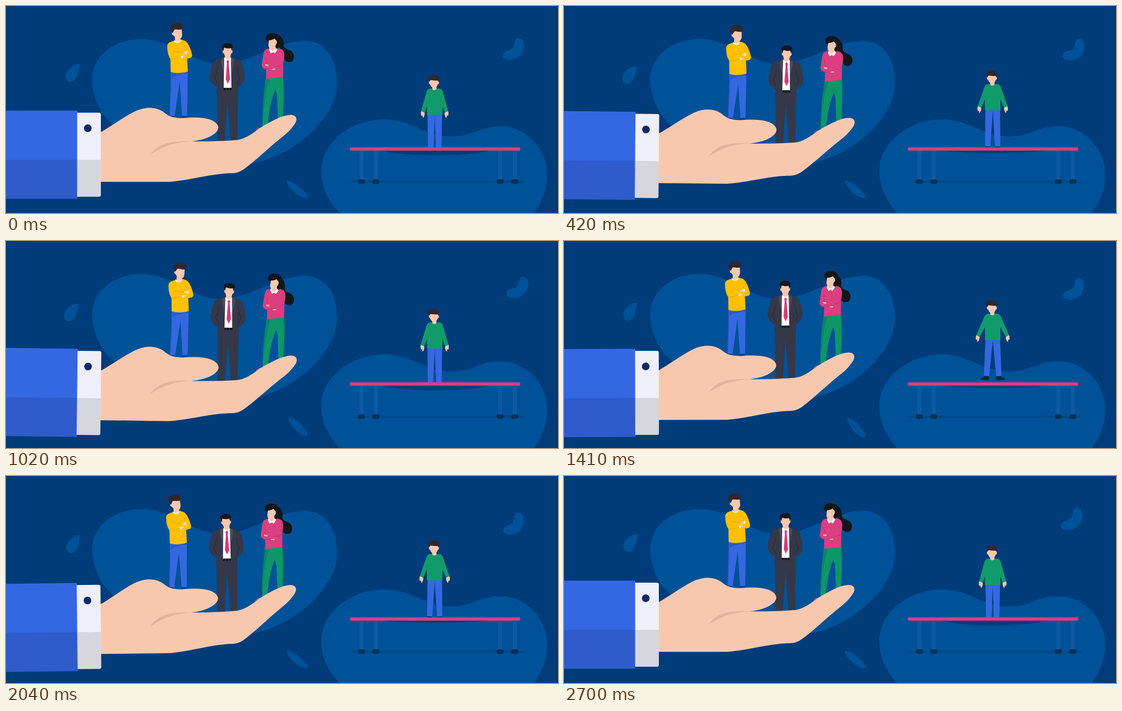
These frames come from a looping animation (1222x458 px, 2730 ms). An HTML page:

```html
<!DOCTYPE html>
<html lang="en">
<head>
<meta charset="utf-8">
<title>Safe hand and trampoline</title>
<style>
html, body { margin: 0; width: 100%; height: 100%; overflow: hidden; background: #003c7a; }
svg { display: block; width: 100%; height: 100%; }
.blob { fill: #005298; }
.skin { fill: #f8c8ae; }
.line { fill: none; stroke-linecap: round; }
</style>
</head>
<body>
<svg viewBox="0 0 1222 458">
  <defs>
    <clipPath id="aboveBar"><path d="M850 0H1050V314H850Z"/></clipPath>
    <g id="post">
      <path d="M-4.3 320H4.3V386H-4.3Z" fill="#0f59a2"/>
      <rect x="-8" y="383.5" width="16" height="10" rx="4.5" fill="#0a3156"/>
    </g>
  </defs>

  <g class="blob">
    <path d="M191 160C193 105 245 73 300 73C370 73 410 128 475 128C540 128 600 77 662 77C705 77 733 115 733 170C733 245 640 333 540 349L400 340L240 266C212 245 191 205 191 160Z"/>
    <path d="M738 458C712 430 698 400 698 365C698 300 765 251 838 251C895 251 930 289 985 289C1030 289 1050 266 1095 266C1150 266 1198 315 1198 372C1198 410 1185 435 1168 458Z"/>
    <path id="drop" d="M161 128C164 128 163 135 161 142C158 155 153 167 143 168C135 168 131 161 132 153C134 140 150 129 161 128Z"/>
    <path id="bean" d="M1134 71C1143 71 1148 80 1147 90C1145 105 1134 118 1117 119C1106 120 1099 115 1100 108C1102 99 1113 99 1120 95C1129 89 1123 72 1134 71Z"/>
    <path id="leaf" d="M622 387C630 386 643 394 653 403C661 410 669 418 668 422C666 427 655 424 646 418C635 411 620 393 622 387Z"/>
  </g>

  <!-- trampoline -->
  <rect x="762" y="386" width="384" height="6" rx="3" fill="#004a8c"/>
  <use href="#post" x="787"/><use href="#post" x="818.5"/>
  <use href="#post" x="1094"/><use href="#post" x="1126.5"/>
  <path id="sag" fill="#003c7a"/>

  <g clip-path="url(#aboveBar)">
    <g id="jumper">
      <g id="legL">
        <path d="M933 238H949.5L946 324H934.5Z" fill="#3568e0"/>
        <path d="M934.5 321H946V330H927Q927 325 934.5 324Z" fill="#12253f"/>
      </g>
      <g id="legR">
        <path d="M965.5 238H949L952 324H963.5Z" fill="#3568e0"/>
        <path d="M963.5 321H952V330H971Q971 325 963.5 324Z" fill="#12253f"/>
      </g>
      <g id="armL">
        <path class="skin" d="M919.5 232L926.5 234C928 240 926 246 923 248L922 242L920 244C918 240 918 236 919.5 232Z"/>
        <path d="M940 183Q933 183 931 190L919 233L926.5 236L936 212Z" fill="#129b6a"/>
      </g>
      <g id="armR">
        <path class="skin" d="M978.5 232L971.5 234C970 240 972 246 975 248L976 242L978 244C980 240 980 236 978.5 232Z"/>
        <path d="M958 183Q965 183 967 190L979 233L971.5 236L962 212Z" fill="#129b6a"/>
      </g>
      <path d="M939 183H959Q966 184 966 192V241H932V192Q932 184 939 183Z" fill="#129b6a"/>
      <path class="skin" d="M943.5 176H953V184Q948 189 943.5 184Z"/>
      <path class="skin" d="M937 164H957.5L958.5 170Q958 174 955.5 174Q954 181 948 182Q941 181 939 174Q936 173 936 169Z"/>
      <path d="M937 168C932 161 934 155 939 155C943 152 952 152 955 155C960 157 959 163 957.5 168L955 165C949 166 943 164 940 164Z" fill="#2f2730"/>
    </g>
  </g>
  <rect x="761" y="312.7" width="377.500" height="7.300" rx="3.650" fill="#db3e7d"/>

  <g id="hand">
    <!-- yellow sweater -->
    <path d="M365 146H402.500L401 246H390L384.500 166L373 246H362Z" fill="#3568e0"/>
    <path d="M365 147L366 180L363 245H362ZM366 149Q385 152 402 146V149Q374 152 367 160Z" fill="#2d57c2"/>
    <path d="M389 243H401V249H389ZM362 243H372V249H362Z" fill="#173a86"/>
    <path d="M373 77C361 79 357 83 357 89C357 100 359 110 364 117L364.500 146Q383 151 402.500 145L401 116C409 116 413 113 412 108C410 97 404 83 398 78Q392 75 386 74Z" fill="#ffc000"/>
    <path class="line" d="M371 101L391 102.500M364 117Q376 118 388 112M398 91Q399 97 396 101" stroke="#e6a400" stroke-width="1.300"/>
    <path class="skin" d="M391 103L399 99L398 104L393 107ZM386 111L395 109L397 112L388 115Z"/>
    <path d="M398 99L401 100V106L398 106ZM388 110L391 110V115L388 115Z" fill="#fff"/>
    <path d="M372 75Q379 83 387 74V77Q380 86 372 78Z" fill="#fff"/>
    <g id="head1">
      <path class="skin" d="M374 66H386V76Q379 83 374 76Z"/>
      <path class="skin" d="M370 52H389L390 64Q389 73 383 73Q375 72 371 65Q367 65 367 60Q368 57 370 58Z"/>
      <path d="M369 60C365 56 362 49 364 45C365 41 370 39 374 40C379 37 389 38 391 42C392 47 391 52 387 52C382 53 377 52 374 51Q371 55 369 60Z" fill="#2f2730"/>
    </g>

    <!-- suit -->
    <path d="M467 182H513.500L512 301H497.500L490.500 210L484 301H468.500Z" fill="#343849"/>
    <path d="M483 112L468 117C460 120 457 126 454 140C451 153 450 160 453 165C456 172 462 177 468 180L465.500 193H481L490 186L500 193H514.500L513 180C520 176 526 170 528 162C529 152 526 140 523 128C521 121 516 119 510 117L498 112Z" fill="#343849"/>
    <path class="line" d="M469 135Q467 150 462 158L468 172M512 135Q514 150 518 158L513 172" stroke="#252938" stroke-width="1.300"/>
    <path d="M483 114H498L499 182H482Z" fill="#fff"/>
    <path d="M483 113L476 118L477 128L482 150ZM498 113L505 118L504 128L499 150Z" fill="#484c5c"/>
    <path d="M488 122L491 119L494 122L493 127L496 162L491 172L486.500 162L489 127Z" fill="#d93b7a"/>
    <path d="M482 181H499.500V186H482Z" fill="#10131a"/>
    <path d="M487 181V186M494 181V186" stroke="#4a4e5e"/>
    <g id="head2">
      <path class="skin" d="M484.500 106H497V114Q491 121 484.500 114Z"/>
      <path class="skin" d="M481 92H500L501.500 100Q501 105 498.500 105Q497 114 491 116Q485 114 482.500 105Q479 104 479.500 98Z"/>
      <path d="M481 100C478 94 477 87 480 86C484 81 492 82 496 83C501 84 504 89 501 94L500 100L498 93C492 95 485 93 483 92Z" fill="#14171c"/>
    </g>

    <!-- pink sweater -->
    <path id="tail" d="M600 63C609 66 615 75 615 84C614 92 618 95 626 97C635 100 639 108 637 116C635 124 626 126 620 122C612 117 615 106 611 99C604 90 596 80 600 63Z" fill="#14161a"/>
    <path d="M576 156L613 155Q617 180 613 250H602L600 197Q598 187 596 186C588 205 582 230 579 268H568C567 235 571 185 576 156Z" fill="#0c966a"/>
    <path d="M576 159L584 164Q577 175 572 220L568 262C567 230 571 185 576 159Z" fill="#0b855f"/>
    <path d="M553 275Q556 271 562 270L576 263L579 268L560 279H554Z" fill="#fff"/>
    <path d="M553 275Q556 271 561 271L559 277L554 279Z" fill="#d93b7a"/>
    <path d="M583 94C574 95 571 98 570 106L566 131Q566 138 576 140V161L613.500 157L614 125C617 112 618 98 608 95L600 93Z" fill="#db3f80"/>
    <path class="line" d="M575 112L577 127M576 140L592 138M599 133Q608 135 613 127" stroke="#bf2f6c" stroke-width="1.200"/>
    <path class="skin" d="M574 129L581 130L581 133L574 132ZM588 139L596 138.500L596 141L589 141Z"/>
    <path class="skin" d="M585 87H597V95L590.500 103L585 95Z"/>
    <path d="M583.500 93L590.500 101L599 93L600.500 97L595 105L591 102L586 105L582.500 97Z" fill="#fff"/>
    <g id="head3">
      <path d="M576 76C573 66 580 60 590 60C602 60 609 69 607 78C606 85 605 93 600 95L592 85Z" fill="#14161a"/>
      <path class="skin" d="M582 76Q591 75 594 72L599 77Q601 83 597 86Q596 96 590 97Q582 96 581 87Z"/>
    </g>

    <!-- arm and palm -->
    <path class="skin" d="M205 282C240 262 265 242 290 231C315 221 335 225 348 234C358 242 365 248 392 248C412 246 440 246 456 253C470 260 473 269 467 277C457 290 432 298 408 299.500C440 300 490 299 515 296C535 292 550 278 570 265C590 254 610 242 630 241C643 241 645 250 641 258C635 268 625 280 610 291C580 315 555 340 528 360C515 369 508 370 495 370C450 372 410 385 362 389H205Z"/>
    <path d="M320 329C335 307 356 297 415 299.500C370 301 349 311 320 329Z" fill="#e4b29f"/>
    <path d="M-30 231.500H158V341H-30Z" fill="#3467e2"/>
    <path d="M-30 340.500H158V426.500H-30Z" fill="#2f5bcb"/>
    <path d="M157.500 236H206Q210 236 210 240V341H157.500Z" fill="#efeff9"/>
    <path d="M157.500 340.500H210V418Q210 422 206 422H157.500Z" fill="#d6d6df"/>
    <circle cx="181" cy="270.500" r="8.500" fill="#0a2a66"/>
  </g>
</svg>
<script>
const LOOP = 2730, SPAN = 2700, BOUNCE = 540;
const el = id => document.getElementById(id);
const clamp = x => Math.min(1, Math.max(0, x));
const ease = x => .5 - .5 * Math.cos(Math.PI * clamp(x));
const hump = (t, peak) => t < peak ? ease(t / peak) : 1 - ease((t - peak) / (SPAN - peak));

// Rotate around (x, y), then shift.
function pose(id, deg, x, y, dx = 0, dy = 0) {
  el(id).setAttribute('transform', `translate(${dx} ${dy}) rotate(${deg} ${x} ${y})`);
}

function tilt(t) {
  if (t < 900) return Math.sin(t / 900 * Math.PI / 2);
  return t < 1800 ? 1 - 2 * ease((t - 900) / 900) : ease((t - 1800) / 900) - 1;
}

// Quick take-off, soft landing.
function jump(t) {
  const p = t % BOUNCE / BOUNCE;
  return p < .5 ? Math.sin(Math.PI * p) : .5 - .5 * Math.cos(2 * Math.PI * p);
}

function draw(t) {
  const sway = tilt(t), early = hump(t, 900), late = hump(t, 1800);
  const mid = (.5 - .5 * Math.cos(2 * Math.PI * t / SPAN)) ** 3;
  const up = jump(t);

  pose('hand', .75 * sway, 0, 325, 0, 8.4 * late);
  pose('head1', 4.3 * (sway + early), 380, 77);
  pose('head2', 4.5 * sway, 491, 113);
  pose('head3', 4.5 * early, 591, 96);
  const swing = .5 * early + .6 * late;
  pose('tail', 5 * swing, 600, 65, 1.5 * swing, 4 * swing);

  pose('drop', 3 * sway, 148, 148, -2.2 * sway - 1.2 * early, 10 * early);
  pose('bean', 4 * sway, 1124, 95, 2.5 * sway + 6.5 * early, 12.3 * late);
  pose('leaf', 9 * mid, 645, 406, 2.5 * mid, 7.5 * mid);

  pose('jumper', 0, 0, 0, 0, -25 * up);
  pose('armL', 9 * up, 936, 187);
  pose('armR', -9 * up, 962, 187);
  pose('legL', 4 * up, 941, 240);
  pose('legR', -4 * up, 957, 240);
  const low = 320 + (10.7 - 5.6 * ease((up - .15) / .3)) / .75;
  el('sag').setAttribute('d', `M828 319C880 ${low} 1020 ${low} 1075 319Z`);
}

const start = performance.now();
function frame(now) {
  draw(Math.min(Math.max(0, now - start) % LOOP, SPAN));
  requestAnimationFrame(frame);
}
frame(start);
</script>
</body>
</html>
```
